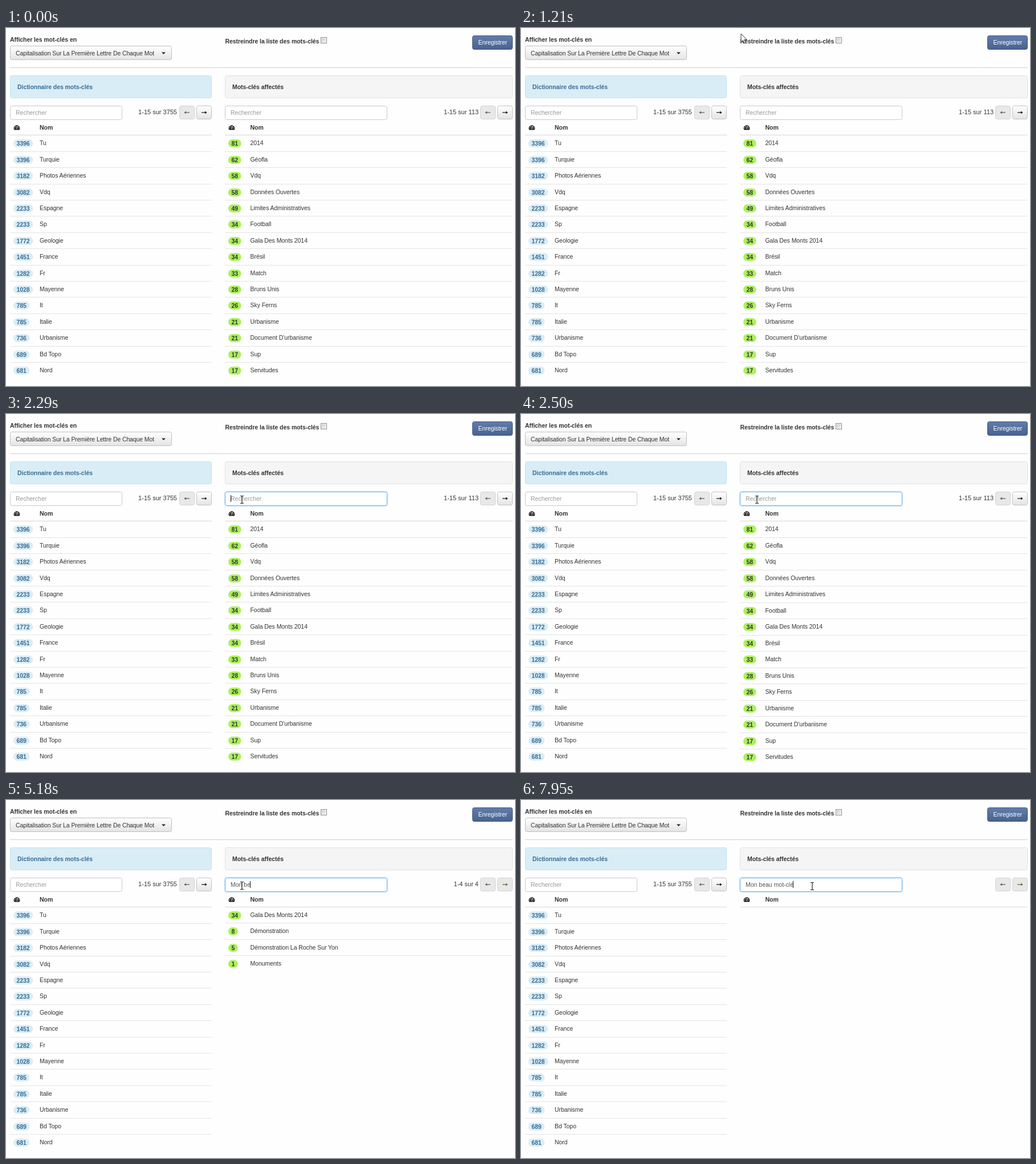
An HTML page that plays this animation: 893 by 627 pixels, repeating every 8 s.

```html
<!DOCTYPE html>
<html lang="fr">
<head>
<meta charset="utf-8">
<title>Mots-clés</title>
<style>
  html, body { margin: 0; width: 100%; height: 100%; overflow: hidden; background: #fefefe; }
  svg { display: block; }
  text { font: 10.5px Arial, "Liberation Sans", sans-serif; fill: #333; letter-spacing: -.06px; white-space: pre; }
  .b { font-weight: bold; }
  .blue { fill: #3a6c94; }
  .hint { fill: #999; letter-spacing: 0; }
  .typed { fill: #555; letter-spacing: 0; }
  .count { font-size: 11px; letter-spacing: 0; text-anchor: end; }
  .menu { letter-spacing: -.11px; }
  .light { fill: #fff; }
</style>
</head>
<body>
<svg id="stage" width="893" height="627" viewBox="0 0 893 627">
  <defs>
    <linearGradient id="grey" x2="0" y2="1"><stop stop-color="#fff"/><stop offset="1" stop-color="#e4e4e4"/></linearGradient>
    <linearGradient id="navy" x2="0" y2="1"><stop stop-color="#617dab"/><stop offset="1" stop-color="#48628f"/></linearGradient>
    <linearGradient id="check" x2="1" y2="1"><stop stop-color="#c9cbd0"/><stop offset="1" stop-color="#f4f4f4"/></linearGradient>
    <filter id="blur" x="-5%" y="-40%" width="110%" height="180%"><feGaussianBlur stdDeviation="1.6"/></filter>
  </defs>
</svg>
<script>
const stage = document.getElementById('stage');

function add(tag, attrs, parent = stage, content = '') {
  const el = document.createElementNS('http://www.w3.org/2000/svg', tag);
  for (const k in attrs) el.setAttribute(k, attrs[k]);
  el.textContent = content;
  parent.append(el);
  return el;
}
const text = (x, y, s, cls = '', parent) => add('text', { x, y, class: cls }, parent, s);
const rect = (x, y, width, height, fill, parent) => add('rect', { x, y, width, height, fill }, parent);
const box = (x, y, w, h, fill, stroke, rx = 3, parent) =>
  add('rect', { x: x + .5, y: y + .5, width: w - 1, height: h - 1, rx, fill, stroke }, parent);
const path = (d, attrs, parent) => add('path', { d, fill: 'none', ...attrs }, parent);
const show = (el, on) => el.setAttribute('visibility', on ? 'visible' : 'hidden');

function pager(x, dir, enabled, ink, parent) {
  box(x, 136, 27, 24, enabled ? 'url(#grey)' : '#e8e8e8', enabled ? '#c2c2c2' : '#d3d3d3', 3, parent);
  const cx = x + 13.5, tip = cx + 4.5 * dir;
  path(`M${cx - 4.5 * dir} 148H${tip}`, { stroke: ink, 'stroke-width': 1.3 }, parent);
  path(`M${tip + dir * .5} 148l${-3.5 * dir} -2.6v5.2z`, { fill: ink }, parent);
}

function gauge(x) {
  path(`M${x + 1} 178.5a5.3 5.3 0 1 1 9 0z`, { fill: '#222' });
  for (let i = 0; i < 4; i++) {
    const a = Math.PI * (1.05 + .3 * i);
    add('circle', { cx: x + 5.5 + 3.5 * Math.cos(a), cy: 175.5 + 3.3 * Math.sin(a), r: .8, fill: '#fff' });
  }
  path(`M${x + 5.5} 177l.6 -4.5`, { stroke: '#fff' });
}

// rows: "count name" entries separated by bars
function table(rows, x, right, nameX, fill, cls, top = 187.95, pitch = 28.4) {
  const g = add('g', {});
  rows.split('|').forEach((row, i) => {
    const [, n, name] = row.match(/(\d+) (.*)/);
    const y = Math.floor(top + pitch * i);
    if (i) rect(x, y, right - x, 1, '#e4e4e4', g);
    add('rect', { x: x + 6, y: y + 8, width: 11 + 5.84 * n.length, height: 14, rx: 7, fill }, g);
    text(x + 11.5, y + 19, n, cls, g);
    text(nameX, y + 18, name, '', g);
  });
  return g;
}

const dictionary = '3396 Tu|3396 Turquie|3182 Photos Aériennes|3082 Vdq|2233 Espagne|2233 Sp|1772 Geologie|' +
  '1451 France|1282 Fr|1028 Mayenne|785 It|785 Italie|736 Urbanisme|689 Bd Topo|681 Nord';
const assigned = '81 2014|62 Géofla|58 Vdq|58 Données Ouvertes|49 Limites Administratives|34 Football|' +
  "34 Gala Des Monts 2014|34 Brésil|33 Match|28 Bruns Unis|26 Sky Ferns|21 Urbanisme|" +
  "21 Document D'urbanisme|17 Sup|17 Servitudes";
const matches = '34 Gala Des Monts 2014|8 Démonstration|5 Démonstration La Roche Sur Yon|1 Monuments';

// Header
text(7, 24, 'Afficher les mot-clés en', 'b');
box(7, 31, 284, 25, 'url(#grey)', '#bfbfbf');
text(17, 47.5, 'Capitalisation Sur La Première Lettre De Chaque Mot', 'menu');
path('M273 42.5h7l-3.5 3.5z', { fill: '#222' });
text(384.5, 27, 'Restreindre la liste des mots-clés', 'b');
box(552, 16, 11, 11, '#f4f4f4', '#8e8f8f', 0);
rect(554, 18, 7, 7, 'url(#check)');
box(818, 13, 71, 25, 'url(#navy)', '#435a83');
text(828.5, 29, 'Enregistrer', 'light');
rect(7, 69, 882, 1, '#cfcfcf');

// Panels
box(7, 83, 354, 40, '#d9edf7', '#bfe3ee');
text(20, 107, 'Dictionnaire des mots-clés', 'b blue');
box(384, 83, 505, 40, '#f5f5f5', '#e1e1e1');
text(397, 107, 'Mots-clés affectés', 'b');

box(7, 136, 197, 25, '#fff', '#c9c9c9');
text(17, 152, 'Rechercher', 'hint');
text(300, 151, '1-15 sur 3755', 'count');
pager(304, -1, false, '#666');
pager(334, 1, true, '#222');

const glow = box(384, 136, 285, 25, '#a0d0f5', '#a0d0f5');
glow.setAttribute('filter', 'url(#blur)');
const field = box(384, 136, 285, 25, '#fff', '#c9c9c9');
const input = text(394, 152, '');
const caret = rect(394, 142, 1, 12, '#222');
const count = text(829, 151, '', 'count');
pager(832, -1, false, '#666');
const nextOn = add('g', {}), nextOff = add('g', {});
pager(862, 1, true, '#222', nextOn);
pager(862, 1, false, '#56783c', nextOff);

for (const [x, right, nameX] of [[7, 361, 59], [384, 889, 428.5]]) {
  gauge(x + 6.5);
  text(nameX, 177.5, 'Nom', 'b');
  rect(x, 187, right - x, 1, '#d8d8d8');
}
table(dictionary, 7, 361, 59, '#d9edf7', 'b blue');
const results = (rows, ...spacing) => table(rows, 384, 889, 428.5, '#acf15c', 'b', ...spacing);
const lists = [results(assigned), results(assigned, 187.95, 28.47), results(matches, 187.4, 28.3)];

// Pointers, both with their hot spot at 0,0
const arrow = path('M0 0V14.5L3.4 11.4L5.8 16.8L8 15.8L5.7 10.5H10.3Z', { fill: '#fff', stroke: '#333' });
const beam = path('M-3 -6.5H-1L0 -5.5L1 -6.5H3M0 -5.5V5.5M-3 6.5H-1L0 5.5L1 6.5H3', { stroke: '#222', 'stroke-width': 1.2 });

const ENTER = 120, FOCUS = 2290, BLINK = 530;

// [time, x, y]
const track = [
  [ENTER, 617, 331], [910, 507, 10], [1210, 386, 10], [1740, 560, 20], [1970, 536, 10],
  [FOCUS, 414, 150], [7490, 414, 150], [7800, 511, 155], [7950, 511, 151]
];
function pointer(t) {
  const i = track.findIndex(p => p[0] > t);
  if (i < 0) return track.at(-1).slice(1);
  const [t0, x0, y0] = track[i - 1], [t1, x1, y1] = track[i];
  const k = (t - t0) / (t1 - t0);
  return [x0 + (x1 - x0) * k, y0 + (y1 - y0) * k];
}

// Bursts of typing: text, time of its first key, time between keys
const keys = [['Mon', 4230, 150], [' be', 4850, 165], ['au ', 5330, 65], ['mot', 5720, 75], ['-clé', 6020, 150]]
  .flatMap(([s, start, gap]) => [...s].map((ch, i) => ({ ch, time: start + i * gap })));

function draw() {
  const t = performance.now() % 8000;

  const focused = t >= FOCUS;
  show(glow, focused);
  field.setAttribute('stroke', focused ? '#62b0ea' : '#c9c9c9');
  const pressed = keys.filter(k => k.time <= t);
  input.textContent = pressed.map(k => k.ch).join('') || 'Rechercher';
  input.setAttribute('class', pressed.length ? 'typed' : 'hint');

  const awake = pressed.at(-1)?.time ?? 1970;
  show(caret, focused && Math.floor((t - awake) / BLINK) % 2 === 0);
  caret.setAttribute('x', Math.floor(394 + (pressed.length ? input.getComputedTextLength() - .5 : 0)));

  const state = [2500, 5180, 7250].filter(time => time <= t).length;
  lists.forEach((g, i) => show(g, i === state));
  count.textContent = ['1-15 sur 113', '1-15 sur 113', '1-4 sur 4', ''][state];
  show(nextOn, state < 2);
  show(nextOff, state > 1);

  const visible = t >= ENTER;
  const [x, y] = visible ? pointer(t) : [0, 0];
  const overField = x > 384 && x < 669 && y > 136 && y < 161;
  show(arrow, visible && !overField);
  show(beam, visible && overField);
  for (const p of [arrow, beam]) p.setAttribute('transform', `translate(${Math.round(x)} ${Math.round(y)})`);
  requestAnimationFrame(draw);
}
draw();
</script>
</body>
</html>
```
